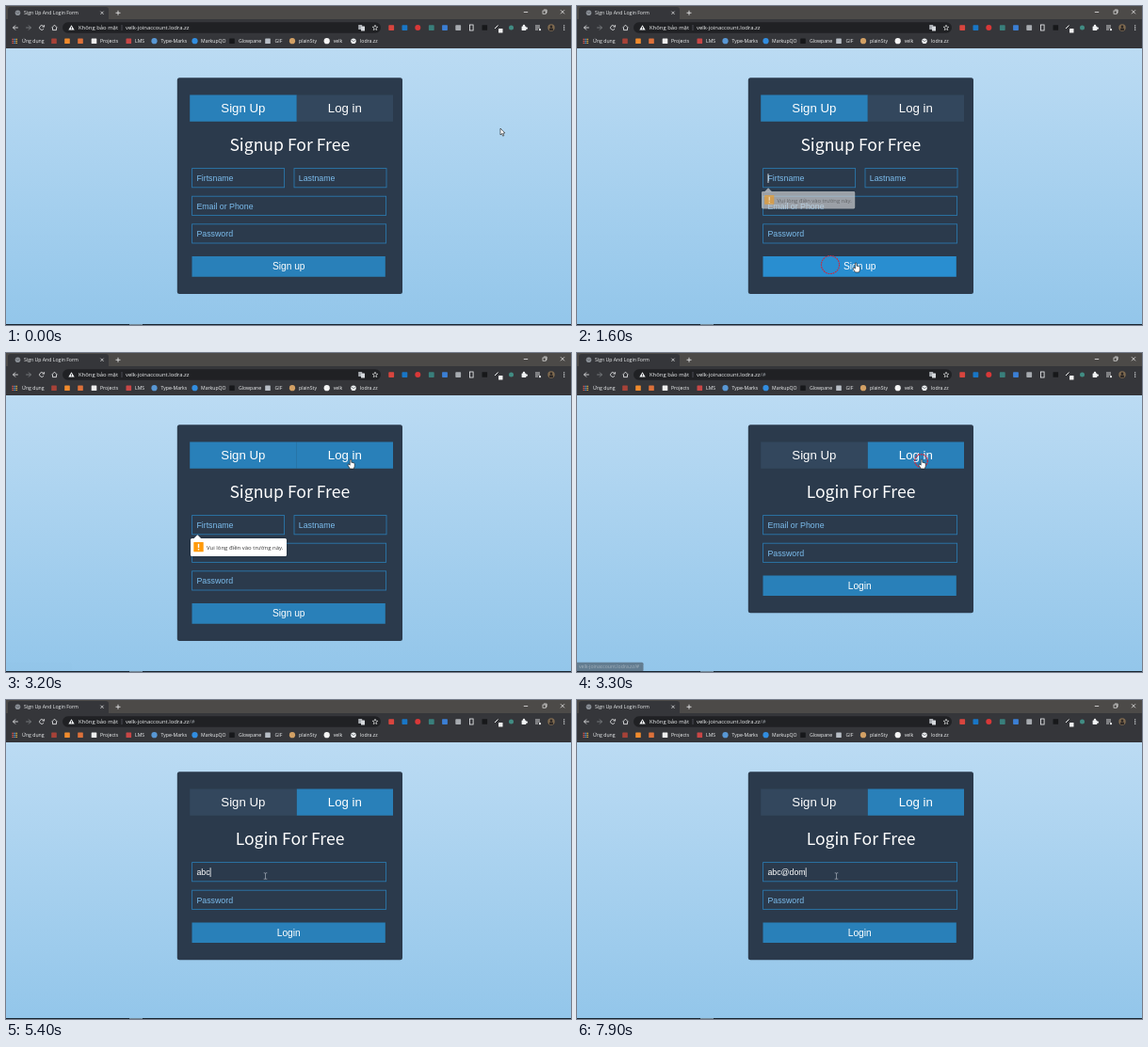
An HTML page with a canvas for the animation above (8 s loop, 600 by 339 pixels).

```html
<!DOCTYPE html>
<html lang="vi">
<head>
<meta charset="utf-8">
<title>Sign Up And Login Form</title>
<style>
html, body { margin: 0; width: 100%; height: 100%; overflow: hidden; background: #202124; }
canvas { display: block; width: 600px; height: 339px; }
</style>
</head>
<body>
<canvas id="stage"></canvas>
<script>
const W = 600, H = 339, LOOP = 8000;
const canvas = document.getElementById('stage');
const ctx = canvas.getContext('2d');
const dpr = Math.max(1, window.devicePixelRatio || 1);
canvas.width = Math.round(W * dpr);
canvas.height = Math.round(H * dpr);

const UI = '"Open Sans", "Noto Sans", sans-serif';
const FORM = '"Liberation Sans", Arial, sans-serif';
const TITLE = '"Noto Sans CJK JP", "Noto Sans CJK SC", "Noto Sans", sans-serif';
const HOST = 'velk-joinaccount.lodra.zz';
const CARD = '#2b3a4c', ACTIVE = '#2980b9', BORDER = '#2b7ab1';
const BLUE = [41, 128, 185], SLATE = [51, 71, 93], HOVER = [41, 142, 208];
const HINT = '#7cbdee', INK = '#f1f3f4';

// Key times of the session
const OVER_BTN = 1150, CLICK_BTN = 1450, LEAVE_BTN = 1900;
const OVER_TAB = 2980, SWAP = 3240, FOCUS = 4750;
const CLICKS = [[CLICK_BTN, 269, 275], [SWAP, 365.5, 114.5], [4620, 275, 187]];
const KEYS = [[5200, 'a'], [5300, 'b'], [5400, 'c'], [7200, '@'], [7700, 'd'], [7800, 'o'], [7900, 'm']];

// Pointer path: time, x, y
const PATH = [
  [250, 525, 130], [1000, 258, 270], [1100, 253, 273], [1400, 269, 274],
  [1480, 271, 274], [1600, 296, 273], [1870, 406, 262], [2000, 399, 225], [2400, 400, 165],
  [2900, 367, 120], [3000, 366, 113], [3350, 366, 113], [3800, 298, 180], [4300, 275.5, 187]
];

const clamp = v => Math.min(1, Math.max(0, v));
const ramp = (t, a, b) => clamp((t - a) / (b - a));
const mix = (a, b, k) => `rgb(${a.map((v, i) => Math.round(v + (b[i] - v) * k))})`;

function pointerAt(t) {
  if (t <= PATH[0][0]) return PATH[0].slice(1);
  for (let i = 1; i < PATH.length; i++) {
    const [t0, x0, y0] = PATH[i - 1], [t1, x1, y1] = PATH[i];
    if (t < t1) {
      const p = (t - t0) / (t1 - t0), k = p * p * (3 - 2 * p) * .5 + p * .5;
      return [x0 + (x1 - x0) * k, y0 + (y1 - y0) * k];
    }
  }
  return PATH[PATH.length - 1].slice(1);
}

function rect(x, y, w, h, color, r = 0) {
  ctx.fillStyle = color;
  ctx.beginPath();
  ctx.roundRect(x, y, w, h, r);
  ctx.fill();
}

function frame(x, y, w, h, color, width) {
  ctx.strokeStyle = color;
  ctx.lineWidth = width;
  ctx.strokeRect(x, y, w, h);
}

function disc(x, y, r, color) {
  ctx.fillStyle = color;
  ctx.beginPath();
  ctx.arc(x, y, r, 0, Math.PI * 2);
  ctx.fill();
}

function ring(x, y, r, color, a = 0, b = Math.PI * 2, width = .8) {
  ctx.strokeStyle = color;
  ctx.lineWidth = width;
  ctx.beginPath();
  ctx.arc(x, y, r, a, b);
  ctx.stroke();
}

// Polyline from a flat list of coordinates
function trace(x, y, pts, close) {
  ctx.beginPath();
  for (let i = 0; i < pts.length; i += 2) ctx.lineTo(x + pts[i], y + pts[i + 1]);
  if (close) ctx.closePath();
}

function line(x, y, pts, color, width = .8) {
  trace(x, y, pts, false);
  ctx.strokeStyle = color;
  ctx.lineWidth = width;
  ctx.stroke();
}

function text(s, x, y, size, family, color, align = 'left') {
  ctx.font = `${size}px ${family}`;
  ctx.textAlign = align;
  ctx.fillStyle = color;
  ctx.fillText(s, x, y);
}

const label = (s, x, y, size = 5.15, color = INK) => text(s, x, y, size, UI, color);

function globe(x, y, color) {
  disc(x, y, 2.8, color);
  line(x, y, [-2, -1, 0, .5, 1.8, -.8], '#44474c', .6);
}

function tabStrip() {
  rect(0, 0, W, 15, '#4c4a48');
  rect(2, 1, 107, 16, '#35363a', 3);
  globe(12.5, 7.2, '#8b9097');
  label('Sign Up And Login Form', 19, 9.2, 5.18);
  line(102, 7.3, [-1.6, -1.6, 1.6, 1.6], INK, .7);
  line(102, 7.3, [-1.6, 1.6, 1.6, -1.6], INK, .7);
  line(119, 7.3, [-2.5, 0, 2.5, 0], INK);
  line(119, 7.3, [0, -2.5, 0, 2.5], INK);
  line(552, 6.5, [-2.2, 0, 2.2, 0], '#fff', .7);
  frame(570, 5, 3.2, 3.2, '#fff', .6);
  line(571, 5, [0, -1, 3.2, -1, 3.2, 2.2, 2.2, 2.2], '#fff', .6);
  line(591, 6.3, [-2, -2, 2, 2], '#fff', .7);
  line(591, 6.3, [-2, 2, 2, -2], '#fff', .7);
}

function toolbar(t) {
  rect(0, 14, W, 31, '#35363a');
  const y = 23;
  line(10, y, [0, -2.5, -2.5, 0, 0, 2.5], INK);
  line(10, y, [-2.5, 0, 2.8, 0], INK);
  line(24, y, [0, -2.5, 2.5, 0, 0, 2.5], '#85888c');
  line(24, y, [-2.8, 0, 2.5, 0], '#85888c');
  ring(38, y, 2.4, INK, .5, 5.6);
  line(38, y, [.5, -1, 2.6, -.8, 2.6, -2.8], INK);
  line(51.5, y, [-3, .2, 0, -2.8, 3, .2], INK);
  line(51.5, y, [-2, 0, -2, 2.6, 2, 2.6, 2, 0], INK);

  rect(60, 17.3, 338, 11.4, '#202124', 5.7);
  trace(69.5, y, [0, -2.8, 3.2, 2.5, -3.2, 2.5], true);
  ctx.fillStyle = INK;
  ctx.fill();
  line(69.5, y, [0, -1, 0, 1.7], '#202124', .7);
  label('Không bảo mật', 77, 25.2, 5.9);
  line(123, y, [0, -3, 0, 3], '#777b80', .5);
  label(HOST, 127, 25.2, 5.9);
  if (t >= SWAP) label('/#', 127 + ctx.measureText(HOST).width, 25.2, 5.9, '#9aa0a6');

  rect(374.2, 20, 4, 5, '#a9adb2', .5);
  rect(377, 21.5, 4, 5, '#d5d8dc', .5);
  const star = [];
  for (let i = 0; i < 10; i++) {
    const r = i % 2 ? 1.3 : 3, a = i * Math.PI / 5 - Math.PI / 2;
    star.push(r * Math.cos(a), r * Math.sin(a));
  }
  trace(392, y + .2, star, true);
  ctx.strokeStyle = INK;
  ctx.lineWidth = .6;
  ctx.stroke();

  const tools = ['#d8453e', '#1976c5', '#d93838', '#397f7b', '#3b7fd4', '#a7abb0'];
  tools.forEach((c, i) => i === 2 ? disc(437.3, y, 3, c) : rect(406.3 + i * 14.2, y - 2.8, 5.8, 5.8, c, .7));
  frame(492.5, y - 3, 3.6, 6, INK, .8);
  rect(505.5, y - 2.8, 5.6, 5.6, '#17181a', .5);
  line(521, y, [-2, 1, 1.5, -2.5], INK, 1);
  rect(523, 24, 4.5, 4.5, '#f2f2f2', .5);
  disc(536.5, y, 2.5, '#418c83');
  rect(547.6, y - 1.5, 4.7, 4.4, INK, .4);
  disc(550, y - 2, 1.2, INK);
  disc(552.8, y + .6, 1.2, INK);
  for (let i = 0; i < 3; i++) line(562, 21 + i * 2, [0, 0, i < 2 ? 5 : 3, 0], INK, .8);
  disc(567, 25.2, 1.1, INK);
  disc(579, y, 3.7, '#806b50');
  disc(579, 22, 1.4, '#2e2926');
  rect(576.9, 23.5, 4.2, 2.5, '#2e2926', 1);
  for (let i = -1; i < 2; i++) disc(592.7, y + i * 2.2, .65, INK);
}

function bookmarks() {
  const y = 37.2;
  const dots = ['#e5564b', '#4f9bd8', '#e8b445'];
  for (let i = 0; i < 9; i++) rect(6.5 + i % 3 * 2, 34.7 + Math.floor(i / 3) * 2, 1.4, 1.4, dots[i % 3]);
  const marks = [
    [51, '#a64238'], [65, '#f08b2d'], [79, '#dd713a'], [93.5, '#eeeeee'], [130.3, '#c84646'],
    [157.5, '#5897d4', 1], [200.5, '#318de0', 1], [240, '#17181b'], [278, '#b8bec6'],
    [304, '#d2a064', 1], [340.7, '#f4f4f4', 1]
  ];
  for (const [x, c, round] of marks) round ? disc(x, y, 3.1, c) : rect(x - 2.8, y - 2.8, 5.6, 5.6, c, .6);
  globe(369, y, '#eceff1');
  const names = [
    [17, 'Ứng dụng'], [100, 'Projects'], [137, 'LMS'], [164.5, 'Type-Marks'], [207, 'MarkupQO'],
    [247, 'Glowpane'], [285.5, 'GIF'], [311, 'plainSty'], [347.7, 'velk'], [376, 'lodra.zz']
  ];
  for (const [x, s] of names) label(s, x, 39.1);
}

function field(x, y, w, s, color = HINT) {
  frame(x, y, w, 20.2, BORDER, .85);
  text(s, x + 4.8, y + 13.3, 8.8, FORM, color);
}

function button(y, s, color) {
  rect(197.5, y, 205.3, 21.7, color);
  text(s, 300.2, y + 14.4, 10.2, FORM, '#fff', 'center');
}

function caret(x, t, since) {
  if (Math.floor((t - since) / 500) % 2 === 0) rect(x, 178.3, .8, 9.6, '#fff');
}

function tooltip(t) {
  const k = ramp(t, CLICK_BTN + 30, CLICK_BTN + 250);
  if (!k) return;
  const s = .94 + .06 * k;
  ctx.save();
  ctx.globalAlpha = k;
  ctx.translate(196, 197);
  ctx.scale(s, s);
  ctx.shadowColor = 'rgba(0,0,0,.4)';
  ctx.shadowBlur = 2 * dpr;
  rect(0, 0, 102, 19, '#fff', 1.5);
  ctx.shadowColor = 'transparent';
  trace(7.3, 0, [-4, .3, 0, -3.8, 4, .3], true);
  ctx.fillStyle = '#fff';
  ctx.fill();
  rect(3.3, 4, 10.4, 10.2, '#ff9a0a', .5);
  rect(7.8, 5.8, 1.4, 4.3, '#fff');
  rect(7.8, 11.1, 1.4, 1.4, '#fff');
  text('Vui lòng điền vào trường này.', 17, 12, 6, UI, '#333');
  ctx.restore();
}

function signup(t) {
  const hot = ramp(t, OVER_BTN, OVER_BTN + 250) * (1 - ramp(t, LEAVE_BTN, LEAVE_BTN + 280));
  text('Signup For Free', 301.3, 154.3, 17.6, TITLE, '#fff', 'center');
  field(197.6, 172.6, 98, 'Firtsname');
  field(306, 172.6, 98, 'Lastname');
  field(197.6, 202.2, 206, 'Email or Phone');
  field(197.6, 231.8, 206, 'Password');
  button(266, 'Sign up', mix(BLUE, HOVER, hot));
  if (t >= CLICK_BTN) caret(202.6, t, CLICK_BTN);
  tooltip(t);
}

function login(t) {
  const typed = KEYS.filter(k => t >= k[0]);
  const value = typed.map(k => k[1]).join('');
  text('Login For Free', 301.5, 154.3, 17.6, TITLE, '#fff', 'center');
  field(197.6, 172.6, 206, value || 'Email or Phone', value ? '#fff' : HINT);
  if (t >= FOCUS) {
    ctx.font = `8.8px ${FORM}`;
    caret(202.5 + ctx.measureText(value).width, t, value ? typed[typed.length - 1][0] : FOCUS);
  }
  field(197.6, 202.2, 206, 'Password');
  button(236.4, 'Login', ACTIVE);
}

function page(t) {
  const sky = ctx.createLinearGradient(0, 45, 0, H);
  sky.addColorStop(0, '#bbdbf3');
  sky.addColorStop(1, '#93c6ea');
  rect(0, 45, W, H - 45, sky);
  const second = t >= SWAP;
  rect(181.8, 76.3, 239.2, second ? 200 : 229.6, CARD, 2.5);
  rect(195.2, 94.5, 113.6, 28.3, second ? mix(SLATE, SLATE, 0) : ACTIVE);
  rect(308.8, 94.5, 102.2, 28.3, mix(SLATE, BLUE, ramp(t, OVER_TAB, OVER_TAB + 200)));
  text('Sign Up', 251.8, 113.2, 13.2, FORM, '#fff', 'center');
  text('Log in', 359.8, 113.2, 13.2, FORM, '#fff', 'center');
  (second ? login : signup)(t);

  rect(0, 338, W, 1, '#17242f');
  rect(131, 338, 14, 1, '#6f8796');
  const show = ramp(t, 3200, 3400) * (1 - ramp(t, 3900, 4150));
  if (show) {
    ctx.globalAlpha = show;
    rect(-2, 328.8, 72.5, 9.6, '#35363a', 1.5);
    label(HOST + '/#', 2, 335.2, 5.15, '#e0e4e8');
    ctx.globalAlpha = 1;
  }
}

function pointer(t) {
  const [x, y] = pointerAt(t);
  const inX = x > 197.5 && x < 404;
  const onBtn = t < SWAP && t >= OVER_BTN && inX && y > 266 && y < 288;
  const onTab = x > 195 && x < 411 && y > 94 && y < 123;
  const fields = t < SWAP ? [173, 202, 232] : [173, 202];
  const onField = inX && fields.some(f => y > f && y < f + 21) &&
    !(t < SWAP && y < 194 && x > 296 && x < 306);

  for (const [at, cx, cy] of CLICKS) {
    const p = (t - at) / 200;
    if (p < 0 || p >= 1) continue;
    ctx.setLineDash([1.8, .8]);
    ring(cx, cy, 5 + 6 * p, '#c22f45', 0, Math.PI * 2, 1.7 - .7 * p);
    ctx.setLineDash([]);
  }

  if (onField) {
    const ibeam = '#b9c2cb';
    line(x, y, [-1.8, -3.2, -.4, -3.2, 0, -2.8, .4, -3.2, 1.8, -3.2], ibeam, .6);
    line(x, y, [0, -3, 0, 3], ibeam, .6);
    line(x, y, [-1.8, 3.2, 1.8, 3.2], ibeam, .6);
    return;
  }
  const hand = [-.8, .3, 0, 0, .8, .5, .8, 3.3, 2.1, 3.4, 3.3, 3.9, 4.3, 4.6,
    4.2, 7.4, 3.3, 10, -.7, 10, -2.8, 6.5, -2.9, 5.2, -2, 5, -.8, 6.2];
  const arrow = [0, 0, 0, 7, 1.6, 5.6, 2.7, 8.2, 3.8, 7.7, 2.7, 5.2, 4.8, 5];
  trace(x, y, onBtn || onTab ? hand : arrow, true);
  ctx.fillStyle = '#fff';
  ctx.strokeStyle = '#111';
  ctx.lineWidth = .6;
  ctx.fill();
  ctx.stroke();
}

function draw(t) {
  ctx.setTransform(dpr, 0, 0, dpr, 0, 0);
  page(t);
  tabStrip();
  toolbar(t);
  bookmarks();
  pointer(t);
}

const start = performance.now();
function tick() {
  draw((performance.now() - start) % LOOP);
  requestAnimationFrame(tick);
}
tick();
</script>
</body>
</html>
```
